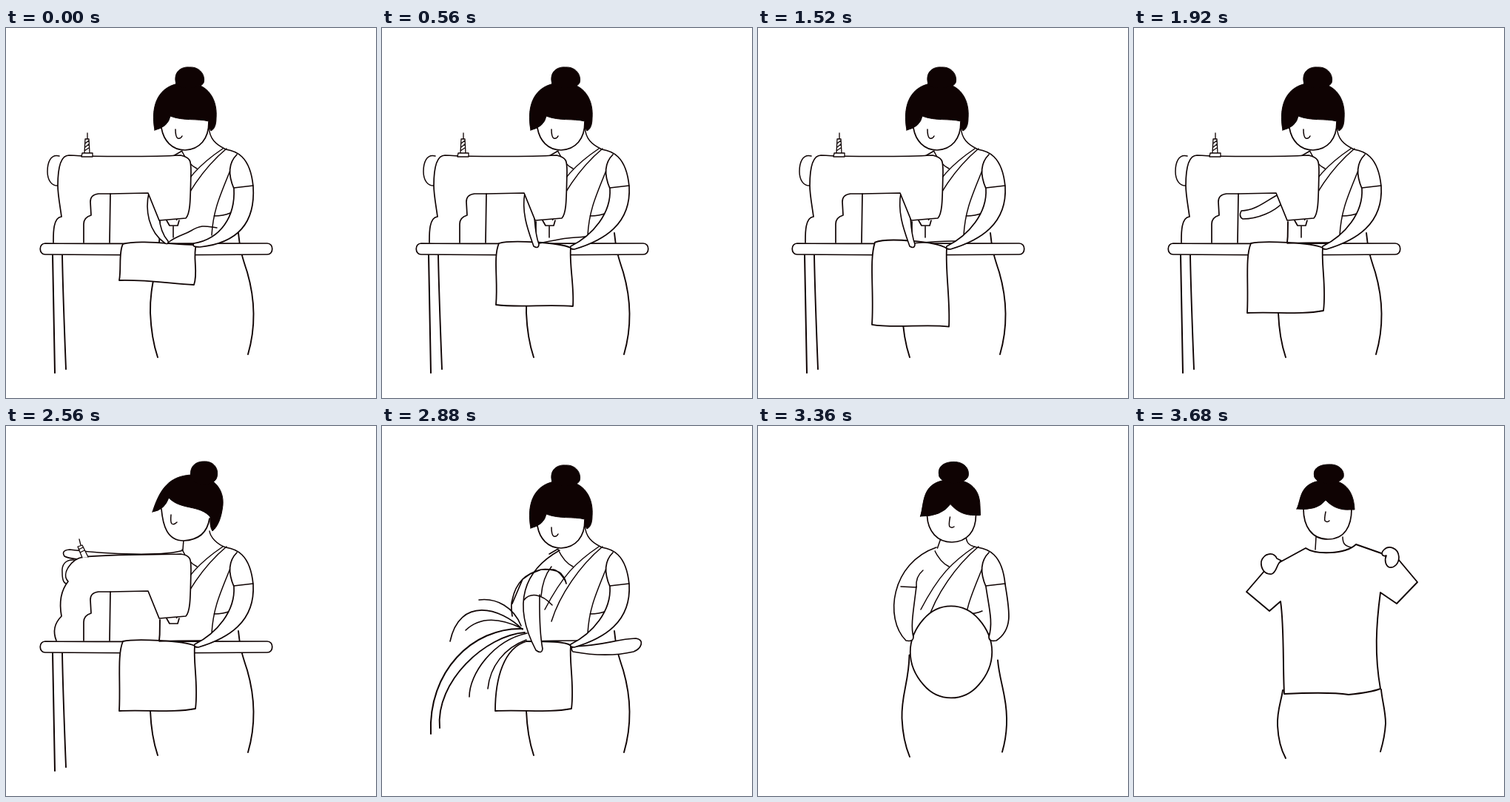
An HTML page with a canvas for the animation above (4510 ms loop, 500x500 px).

```html
<!DOCTYPE html>
<html lang="en">
<head>
<meta charset="utf-8">
<title>Sewing</title>
<style>
  html, body { margin: 0; height: 100%; overflow: hidden; background: #fff; }
  canvas { display: block; }
</style>
</head>
<body>
<canvas id="stage" width="500" height="500"></canvas>
<script>
const LOOP = 4510, STEP = 80, LAST = 46, INK = '#0f0303', PAPER = '#fff';
const ctx = document.getElementById('stage').getContext('2d');
const NUM = /[\d.-]+/g;

// Scale a path about a point
const scale = (d, sx, sy, cx, cy) => {
  let i = 0;
  return d.replace(NUM, n => i++ % 2 ? cy + (n - cy) * sy : cx + (n - cx) * sx);
};
const mix = (a, b, k) => {
  const to = b.match(NUM);
  let i = 0;
  return a.replace(NUM, n => +n + (to[i++] - n) * k);
};
const shape = d => d.replace(NUM, '#');

const parts = [];
// Keys alternate step and path; unlike paths switch hard
const part = (fill, width, ...keys) => parts.push({ fill, width, keys });

function pathAt(keys, step) {
  let i = 0;
  while (i + 2 < keys.length && keys[i + 2] <= step) i += 2;
  const [from, a, to, b] = keys.slice(i, i + 4);
  if (!b || shape(a) !== shape(b)) return a;
  return mix(a, b, (step - from) / (to - from));
}

// Skirt and blouse
const hipL = 'M208,262 C209,320 194,340 195,385 C196,410 200,430 205,445';
const hipR = 'M314,277 C316,300 320,312 326,330 C339,375 336,410 327,441';
part(null, 1.9, 0, hipL, 39, hipL, 45, 'M201,357 C199,372 193,385 194,405 C195,425 200,440 205,449');
part(null, 1.9, 0, hipR, 39, hipR, 45, 'M334,356 C335,370 340,385 340,402 C339,420 336,430 333,440');
part(null, 1.5, 0, 'M238,167 Q246,184 258,190 M293,163 C262,184 244,202 220,248 ' +
  'M298,163 C268,188 240,228 229,264 M304,190 C290,225 280,245 278,280 M281,254 Q294,254 303,250', 43, '');

// Neck
const neck = 'M238,166 L226,173 M274,133 C275,150 283,157 297,164';
const neckTurned = 'M240,154 L239,167 M275,142 C276,150 285,160 297,164';
part(null, 1.5, 0, neck, 24, neck, 28, neckTurned, 32, neckTurned, 35, neck, 36, neck,
  39, 'M247,157 L240,163 M281,154 C283,160 290,162 298,164',
  45, 'M246,150 L245,167 M282,150 C282,160 286,162 293,164');

// Table
const legL = 'M63,307 C64,360 65,410 66,466', legR = 'M76,307 C77,360 79,410 81,461';
const bentL = 'M190,274 C122,272 62,332 66,416', bentR = 'M193,279 C140,283 72,345 78,408';
const shrink = d => scale(d, .2, .2, 230, 285);
part(null, 2, 0, legL, 32, legL, 36, bentL, 38, shrink(bentL), 39, '');
part(null, 1.9, 0, legR, 32, legR, 36, bentR, 38, shrink(bentR), 39, '');
const top0 = 'M53,291 C140,292 260,291 353,291 C362,291 362,306 353,306 C260,307 140,307 53,306 C44,306 44,291 53,291Z';
const top1 = 'M257,298 C300,297 315,288 343,287 C356,289 350,301 340,305 C310,312 280,309 258,305 C256,303 256,300 257,298Z';
part(PAPER, 1.7, 0, top0, 32, top0, 36, top1, 38, shrink(top1), 39, '');

// Strands drawn into the hands
const strands = 'M190,275 C160,245 105,230 92,291 M188,270 C178,245 155,232 131,235 ' +
  'M188,273 C165,262 135,255 113,276 ' +
  'M196,280 C150,290 118,335 118,366 M195,289 C165,300 146,325 143,355';
part(null, 1.6, 0, '', 34, scale(strands, 1.3, 1.1, 190, 272), 36, strands, 38, shrink(strands), 39, '');

// Cloth, later the ball
const cloth0 = 'M158,292 C152,303 156,325 153,341 C190,340 220,345 254,347 C260,330 252,310 257,293 C235,294 180,285 158,292Z';
const cloth1 = 'M158,291 C150,310 157,340 154,374 C185,378 225,373 258,376 C260,350 253,320 255,297 C240,290 175,286 158,291Z';
const cloth2 = 'M158,291 C150,310 155,345 153,385 C190,383 225,388 256,382 C260,350 253,320 255,297 C240,290 175,287 158,291Z';
const cloth3 = 'M195,291 C165,300 153,340 153,385 C190,383 225,388 256,382 C260,350 253,320 255,297 C250,291 220,291 195,291Z';
const ball = 'M250,278 C243,286 243,296 250,304 C256,311 266,311 272,304 C279,296 279,286 272,278 C266,271 256,271 250,278Z';
part(PAPER, 1.8, 0, cloth0, 7, cloth1, 8, cloth0, 14, cloth1, 19, scale(cloth1, 1, 1.34, 205, 295),
  21, cloth2, 32, cloth2, 36, cloth3, 39, ball, 42, scale(ball, 3.4, 3.4, 261, 285), 43, '');
const fold0 = 'M219,290 C232,280 240,280 250,274 C265,265 270,268 285,270';
const fold1 = 'M212,291 C232,287 250,283 262,283 C270,283 275,282 281,281';
const fold2 = 'M207,291 C230,290 250,290 262,290 C268,290 270,290 281,290';
part(null, 1.5, 0, fold0, 7, fold1, 8, fold0, 14, fold1, 21, fold2, 37, '');

// Arms
const armR = (wrist, palm, elbow) => 'M297,164 C310,166 330,172 334,214 ' + wrist + palm + elbow +
  ' 308,217 C302,203 298,185 312,171';
const right0 = armR('C338,275 300,292 262,296 ', 'Q250,296 254,291 ', 'C290,285 310,255');
const right1 = armR('C337,265 300,287 260,299 ', 'Q253,299 255,295 ', 'C285,280 310,250');
const right2 = armR('C337,255 318,290 282,306 ', 'Q275,306 278,301 ', 'C300,275 309,245');
const right3 = armR('C340,250 345,275 322,290 ', 'Q312,292 312,285 ', 'C318,265 312,245');
part(PAPER, 1.7, 0, right0, 7, right1, 8, right0, 14, right1, 36, right1, 39, right2, 42, right3, 43, '');
part(null, 1.5, 0, 'M308,216 L334,213', 43, '');
const left0 = 'M193,223 C188,245 192,275 215,291 Q220,293 219,288 C212,280 208,270 207,255';
const left1 = 'M193,223 C188,250 198,275 205,295 Q212,299 212,292 C208,282 207,270 206,257';
const reach = 'M197,224 C180,232 165,247 145,247 Q141,255 147,258 C168,258 190,248 201,236';
const wheelHold = 'M239,168 C215,176 140,174 86,167 Q74,168 79,176 C90,182 120,180 160,185';
const left2 = 'M240,168 C192,195 175,240 208,303 Q216,309 217,301 C212,275 213,240 213,228';
const left3 = 'M241,164 C178,188 176,266 237,300 Q246,299 242,294 C215,280 212,255 214,217';
const left4 = 'M241,164 C180,185 170,260 200,290 Q210,292 210,285 C206,270 210,250 214,217';
part(PAPER, 1.6, 0, left0, 7, left1, 8, left0, 14, left1, 21, left1, 24, reach,
  28, wheelHold, 32, wheelHold, 35, left2, 36, left2, 39, left3, 42, left4, 43, '');
part(null, 1.5, 0, '', 38, 'M193,217 L214,218 C213,208 217,200 223,195', 43, '');

// Sewing machine
const wheel = 'M72,173 C60,170 56,182 56,194 C56,206 62,214 71,213';
part(PAPER, 1.5, 0, wheel, 31, wheel, 32, 'M92,181 C80,180 75,188 76,198 C76,208 78,214 84,213', 34, '');
const under = ' L207,260 L192,223 L141,224 L140,290';
const body0 = 'M64,290 C64,280 63,256 75,255 C73,240 70,225 70,213 C70,200 71,172 85,172 ' +
  'C120,174 200,174 236,172 C250,175 250,180 250,195 C249,225 250,250 243,257' + under;
const body1 = 'M68,290 C62,275 67,265 75,257 C71,235 76,220 84,210 C74,200 88,180 104,177 ' +
  'C140,173 200,174 236,173 C250,175 250,180 250,195 C249,225 250,250 243,257' + under;
const body2 = 'M176,257 C175,250 174,240 176,235 C178,225 182,215 190,207 C195,202 205,196 215,194 ' +
  'C225,193 240,195 243,201 C246,204 248,208 249,213 C248,208 240,196 232,194 L215,194 L200,200 L190,207 L176,240';
part(PAPER, 1.7, 0, body0, 31, body0, 32, body1, 36, body2, 38, shrink(body2), 39, '');
part(null, 1.7, 0, 'M141,224 L125,224 Q114,225 114,235 L115,253 Q105,256 105,265 L105,290', 34, '');
part(null, 1.5, 0, '', 35, 'M215,230 Q217,205 229,190 M192,235 C200,225 215,226 230,242', 38, '');
part(PAPER, 1.7, 0, 'M217,260 L221,267 L232,267 L234,260', 34, '');
part(null, 1.6, 0, 'M226,268 L226,283', 29, '');
const spool = 'M102,174 L103,169 L117,169 L117,174Z M106,169 L107,150 L112,150 L113,169 ' +
  'M110,150 L110,142 M107,156 L112,152 M107,161 L112,157 M106,166 L112,162';
part(PAPER, 1.3, 0, spool, 32, 'M103,178 L97,163 L103,161 L111,177 M101,161 L99,153 ' +
  'M98,167 L104,164 M100,171 L106,168', 34, '');

// Head: facing down, turned, frontal, final
const head = (fill, width, down, turned, front, end) =>
  part(fill, width, 0, down, 24, down, 28, turned, 32, turned, 35, down, 36, down, 39, front, 45, end);
head(PAPER, 1.7,
  'M210,135 C213,152 224,165 242,165 C262,164 274,150 274,127',
  'M210,112 C212,135 218,155 240,155 C260,154 272,145 275,125',
  'M228,130 C230,150 245,161 262,161 C280,160 295,150 295,128',
  'M229,112 C229,135 240,153 262,153 C285,153 294,135 294,112');
head(INK, 1,
  'M201,138 C195,105 205,76 241,74 C276,73 286,100 284,122 C284,132 281,137 277,139 Q273,134 274,126 C258,122 240,126 222,119 Q219,134 201,138Z',
  'M198,116 C208,85 220,68 250,66 C280,66 295,85 293,107 C291,125 286,136 279,142 Q275,136 276,123 C262,106 236,114 220,97 Q214,114 198,116Z',
  'M219,132 C224,110 217,72 262,72 C285,72 302,80 302,102 C302,110 303,120 303,128 Q300,129 295,128 C280,128 270,122 261,111 Q248,130 219,132Z',
  'M220,112 C227,98 222,74 262,73 C282,73 297,85 298,113 C298,113 298,113 298,113 Q296,113 292,113 C280,114 268,110 259,100 Q248,115 220,112Z');
head(INK, 1,
  'M230,76 C225,58 238,52 248,53 C262,52 270,64 267,74 C264,82 235,84 230,76Z',
  'M250,70 C247,55 256,48 267,48 C281,47 288,58 285,69 C282,82 255,82 250,70Z',
  'M246,67 C242,50 255,45 265,45 C280,45 288,56 285,67 C281,80 250,80 246,67Z',
  'M244,69 C240,56 253,52 263,52 C277,51 285,60 283,69 C278,80 248,81 244,69Z');
head(null, 1.5,
  'M229,137 Q229,147 232,149 Q236,150 238,146',
  'M223,120 Q222,130 224,132 Q227,134 231,130',
  'M260,130 Q258,142 260,144 Q263,146 266,144',
  'M259,116 Q257,126 258,128 Q261,131 264,128');

// Shirt bursts out, overshoots and settles
const pop = (width, d) => {
  const at = (sx, sy) => scale(d, sx, sy, 287, 266);
  part(PAPER, width, 0, '', 43, at(.6, .6), 45, at(1.15, 1.33), 46, d);
};
pop(1.9, 'M232,165 L177,195 L152,224 L183,250 L198,237 C203,270 201,320 203,362 ' +
  'C225,361 270,360 290,363 Q320,360 333,355 C325,310 327,270 333,225 L355,240 L383,211 L357,180 L300,160 C285,174 245,174 232,165Z');
pop(1.7, 'M186,200 C176,201 171,192 172,183 C176,171 189,170 193,179 L199,182 C193,185 193,198 186,200Z');
pop(1.7, 'M345,191 C352,192 358,186 358,177 C357,164 344,161 338,167 C333,172 335,177 341,175 C338,181 340,189 345,191Z');

ctx.lineCap = ctx.lineJoin = 'round';
ctx.strokeStyle = INK;

function draw() {
  const step = Math.min(LAST, Math.floor(performance.now() % LOOP / STEP));
  ctx.fillStyle = PAPER;
  ctx.fillRect(0, 0, 500, 500);
  for (const { fill, width, keys } of parts) {
    const path = new Path2D(pathAt(keys, step));
    if (fill) {
      ctx.fillStyle = fill;
      ctx.fill(path);
    }
    ctx.lineWidth = width;
    ctx.stroke(path);
  }
  requestAnimationFrame(draw);
}
draw();
</script>
</body>
</html>
```
